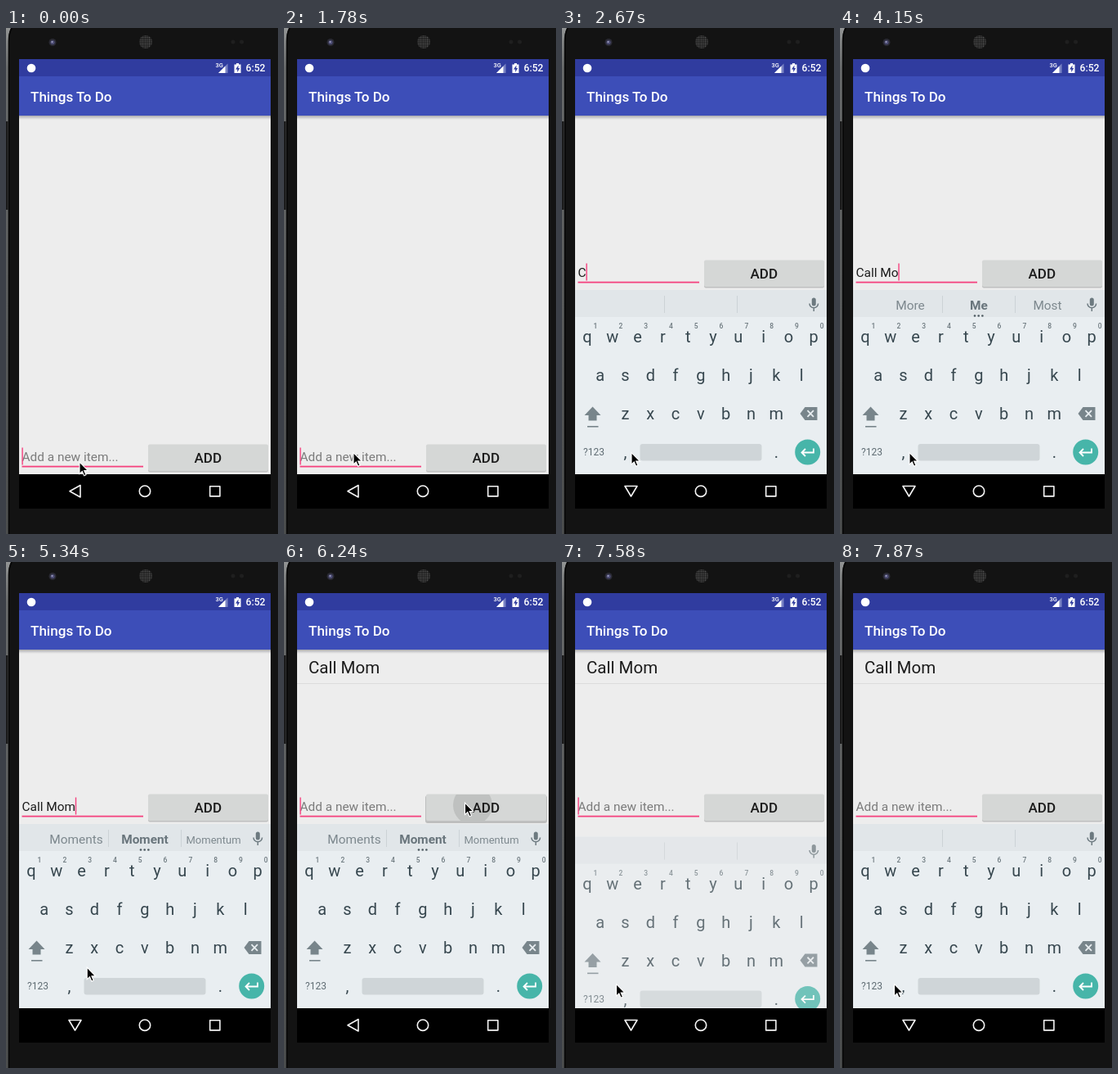
These frames come from a looping animation (333 by 618 pixels, 8 s). An HTML page:

```html
<!DOCTYPE html>
<html lang="en">
<head>
<meta charset="utf-8">
<title>Things To Do</title>
<style>
  html, body { margin: 0; width: 100%; height: 100%; overflow: hidden; background: #131313; }
  svg { display: block; width: 333px; height: 618px; }
  text { font-family: Roboto, "Noto Sans", sans-serif; white-space: pre; }
  .mid { text-anchor: middle; }
  .key { font-size: 20px; fill: #37474f; }
  .digit { font-size: 8.5px; font-weight: 500; fill: #6c787e; }
  .word { font-size: 15.4px; fill: #7d888e; }
  .field { font-size: 15.4px; }
  .nav { fill: none; stroke: #f4f4f4; stroke-width: 1.6; stroke-linejoin: round; }
</style>
</head>
<body>
<svg viewBox="0 0 333 618">
  <defs>
    <linearGradient id="edge" x2="0" y2="1">
      <stop stop-color="#929494"/><stop offset=".08" stop-color="#6a6c6c"/><stop offset="1" stop-color="#4c4e4e"/>
    </linearGradient>
    <linearGradient id="shade" x2="0" y2="1">
      <stop stop-color="#a9a9ad"/><stop offset=".55" stop-color="#d2d2d3"/><stop offset="1" stop-color="#ededed"/>
    </linearGradient>
    <pattern id="mesh" width="2.6" height="2.6" patternUnits="userSpaceOnUse">
      <rect width="2.6" height="2.6" fill="#1b1b1b"/><circle cx="1.3" cy="1.3" r=".85" fill="#585858"/>
    </pattern>
    <clipPath id="buttonClip"><rect x="174" y="509" width="147" height="32" rx="2"/></clipPath>
    <clipPath id="contentClip"><rect x="16" y="107" width="308" height="438"/></clipPath>
  </defs>

  <!-- phone body -->
  <rect width="333" height="618" fill="#131313"/>
  <path d="M0 0H6Q3 6 3 16V618H0Z" fill="url(#edge)"/>
  <path d="M3.5 618V16Q3.5 6 7 0" fill="none" stroke="#050505" stroke-width="1.6"/>
  <rect y="114" width="2.5" height="108" fill="#1a1a1a"/>
  <circle cx="57" cy="17.5" r="4.5" fill="#2b2b35"/>
  <circle cx="57" cy="17.5" r="2.6" fill="#4c4c74"/>
  <circle cx="56.5" cy="17" r="1" fill="#a9a9c8"/>
  <circle cx="171" cy="17" r="8" fill="url(#mesh)"/>
  <circle cx="278" cy="17" r="2.5" fill="#1f1f1f"/>
  <circle cx="288.5" cy="17" r="2.5" fill="#1f1f1f"/>

  <!-- screen -->
  <rect x="16" y="38" width="308" height="549" fill="#ededed"/>
  <rect x="16" y="107" width="308" height="5" fill="url(#shade)"/>
  <rect x="16" y="38" width="308" height="22" fill="#303c9f"/>
  <rect x="16" y="59" width="308" height="48" fill="#3d4eb8"/>
  <circle cx="31" cy="49" r="5.3" fill="#fff"/>
  <text x="256.5" y="48" font-size="7.5" font-weight="500" fill="#fff">3G</text>
  <path d="M271.5 43.5V55H260Z" fill="#7a83c4"/>
  <path d="M268.5 46.5V55H260Z" fill="#fff"/>
  <path d="M279.5 44.5H282V43H285V44.5H287.5V55H279.5Z" fill="#fff"/>
  <path d="M284.5 45.5L281 50.5H283.2V54L286.2 49H284.3Z" fill="#303c9f"/>
  <text x="293.5" y="53.2" font-size="12.2" font-weight="500" fill="#fff">6:52</text>
  <text x="30" y="90" font-size="17.1" font-weight="500" fill="#fff">Things To Do</text>

  <g id="item">
    <text x="30" y="136" font-size="20.5" fill="#1c1c1c">Call Mom</text>
    <rect x="16" y="148" width="308" height="1" fill="#dcdcdc"/>
  </g>

  <g clip-path="url(#contentClip)">
    <g id="row">
      <text id="field" class="field" x="19.5" y="529"></text>
      <rect x="19.5" y="534.7" width="148.5" height="1.8" fill="#f5427f"/>
      <rect id="caret" y="512.5" width="1.4" height="21" fill="#f5427f"/>
      <rect id="lift" x="173" y="510" width="149" height="34" rx="3" fill="#bdbebe"/>
      <rect x="174" y="509.5" width="147" height="33" rx="2" fill="#bfc0c0"/>
      <rect x="174" y="508.5" width="147" height="32.5" rx="2" fill="#d5d7d6"/>
      <g clip-path="url(#buttonClip)"><circle id="ripple" cx="231" cy="522" fill="#bfc1c0"/></g>
      <text class="mid" x="247.3" y="530.7" font-size="17" font-weight="500" fill="#1b1b1b">ADD</text>
    </g>
    <g id="keyboard">
      <rect x="16" y="320" width="308" height="225" fill="#e9eef1"/>
      <rect x="16" y="320" width="308" height="33" fill="#e1e6e9"/>
      <path d="M125.5 327V348M214.5 327V348" stroke="#ccd2d6"/>
      <g id="words"></g>
      <g id="dots" fill="#4d5a61">
        <circle cx="165" cy="351.5" r="1.3"/><circle cx="169.7" cy="351.5" r="1.3"/><circle cx="174.4" cy="351.5" r="1.3"/>
      </g>
      <rect x="305.8" y="329.5" width="5" height="10" rx="2.5" fill="#6d7a80"/>
      <path d="M303 336.5a5.3 5.3 0 0 0 10.6 0M308.3 342V346" fill="none" stroke="#6d7a80" stroke-width="1.5"/>
      <g id="keys"></g>
      <path d="M37.5 462.5L47.5 473H42.5V479.5H32.5V473H27.5Z" fill="#78858b"/>
      <rect x="31" y="486" width="13.5" height="1.6" fill="#78858b"/>
      <path d="M291.5 471L297.5 463H312.5V479H297.5Z" fill="#78858b"/>
      <path d="M300.5 467.2L308 474.8M308 467.2L300.5 474.8" stroke="#e9eef1" stroke-width="1.8"/>
      <text class="mid" x="39" y="522.3" font-size="12" fill="#5f6c73">?123</text>
      <rect x="95.5" y="508" width="149" height="20.5" rx="3" fill="#cfd5d8"/>
      <circle cx="300.7" cy="518" r="15.5" fill="#47b5a9"/>
      <path d="M308 513.5V518.5H294M298 514L293.5 518.5L298 523" fill="none" stroke="#fff" stroke-width="1.8"/>
    </g>
  </g>

  <rect x="16" y="545" width="308" height="42" fill="#000"/>
  <path id="back" class="nav"/>
  <circle class="nav" cx="170" cy="565.7" r="6.7"/>
  <rect class="nav" x="249.7" y="559.7" width="12.2" height="12.2"/>

  <path id="cursor" d="M0 0V14.6L3.3 11.5L5.6 16.8L8 15.8L5.7 10.6H10.4Z" fill="#000" stroke="#fff" stroke-width="1.1"/>
</svg>
<script>
const LOOP = 8000, TICK = 148.2, LAST = 53;
const $ = id => document.getElementById(id);
const set = (el, attrs) => Object.entries(attrs).forEach(([k, v]) => el.setAttribute(k, v));

function addText(parent, cls, x, y, str = '') {
  const el = document.createElementNS('http://www.w3.org/2000/svg', 'text');
  set(el, { class: cls, x, y });
  el.textContent = str;
  return parent.appendChild(el);
}

// Keys
const PITCH = 30.8;
[['qwertyuiop', 31, 384], ['asdfghjkl', 46.7, 431], ['zxcvbnm', 77.5, 478]].forEach(([letters, x, y]) =>
  [...letters].forEach((c, i) => addText($('keys'), 'key mid', x + i * PITCH, y, c)));
[...'1234567890'].forEach((c, i) => addText($('keys'), 'digit mid', 41 + i * PITCH, 367, c));
addText($('keys'), 'key mid', 77.5, 525, ',');
addText($('keys'), 'key mid', 262.5, 525, '.');

const words = [86, 170, 254].map(x => addText($('words'), 'word mid', x, 343.7));
set(words[1], { style: 'font-weight:700;fill:#69757c' });

// All timings below are in ticks.
const typed = [[0, ''], [18, 'C'], [20, 'Ca'], [21, 'Cal'], [22, 'Call'], [23, 'Call '],
  [25, 'Call M'], [26, 'Call Mo'], [34, 'Call Mom'], [42, '']];
const suggestions = [[0, ''], [19, 'Can C Come'], [21, 'Can Cal Call'], [22, 'Called Call Calls'],
  [23, 'Me You My'], [25, 'My M Me'], [27, 'More Me Most'], [35, 'Moments Moment Momentum'], [46, '']];
const caretOn = [[0, 2], [5, 8], [10, 15], [18, 29], [32, 37], [40, 45], [49, 53]];
const keyboardShown = [[0, 0], [12, 0], [15, 1], [42, 1], [45, 0], [49, 0], [52, 1]];
const cursorPath = [[0, 90, 530], [2, 85, 518.5], [35, 85, 518.5], [40, 221.5, 294],
  [42, 221.5, 294], [47, 67.5, 487.5], [48, 66.5, 515.5]];

const latest = (list, n) => list.filter(([start]) => start <= n).pop()[1];

function tween(keys, n) {
  const i = keys.findIndex(k => k[0] > n);
  if (i < 0) return keys[keys.length - 1].slice(1);
  const [t0, ...a] = keys[i - 1], [t1, ...b] = keys[i];
  const p = (n - t0) / (t1 - t0), e = p * p * (3 - 2 * p);
  return a.map((v, j) => v + (b[j] - v) * e);
}

function draw(n) {
  const text = latest(typed, n), field = $('field');
  field.textContent = text || 'Add a new item...';
  set(field, { fill: text ? '#1c1c1c' : '#7b7b7b' });
  const caretX = 19.4 + (text ? field.getComputedTextLength() : 0);
  const lit = caretOn.some(([a, b]) => n >= a && n < b);
  set($('caret'), { x: caretX, opacity: lit ? 1 : 0 });

  const [shown] = tween(keyboardShown, n);
  const raised = (n >= 13 && n < 43) || n >= 50;
  set($('row'), { transform: `translate(0 ${raised ? -225 : 0})` });
  set($('keyboard'), { opacity: shown, transform: `translate(0 ${(1 - shown) * 60})` });
  const down = (n >= 13 && n < 42) || n >= 50;
  set($('back'), { d: down ? 'M77 559.5H92L84.5 572Z' : 'M78 565.7L91 558.5V573Z' });

  const list = latest(suggestions, n).split(' ');
  words.forEach((el, i) => {
    const word = list[i] || '';
    el.textContent = word;
    el.style.fontSize = word.length > 7 ? '13px' : '15.4px';
  });
  set($('dots'), { opacity: list.length > 1 ? 1 : 0 });

  const press = n - 41, pressed = press >= 0 && press < 4;
  set($('ripple'), { r: pressed ? 12 + press * 12 : 0, opacity: press > 1 ? 0.6 - 0.2 * press + 0.2 : 1 });
  set($('lift'), { opacity: pressed ? 1 : 0 });
  set($('item'), { opacity: n >= 42 ? 1 : 0 });

  const [x, y] = tween(cursorPath, n);
  set($('cursor'), { transform: `translate(${x} ${y})` });
}

const start = performance.now();
function frame() {
  const t = (performance.now() - start) % LOOP;
  draw(Math.min(LAST, Math.floor(t / TICK)));
  requestAnimationFrame(frame);
}
draw(0);
requestAnimationFrame(frame);
</script>
</body>
</html>
```
